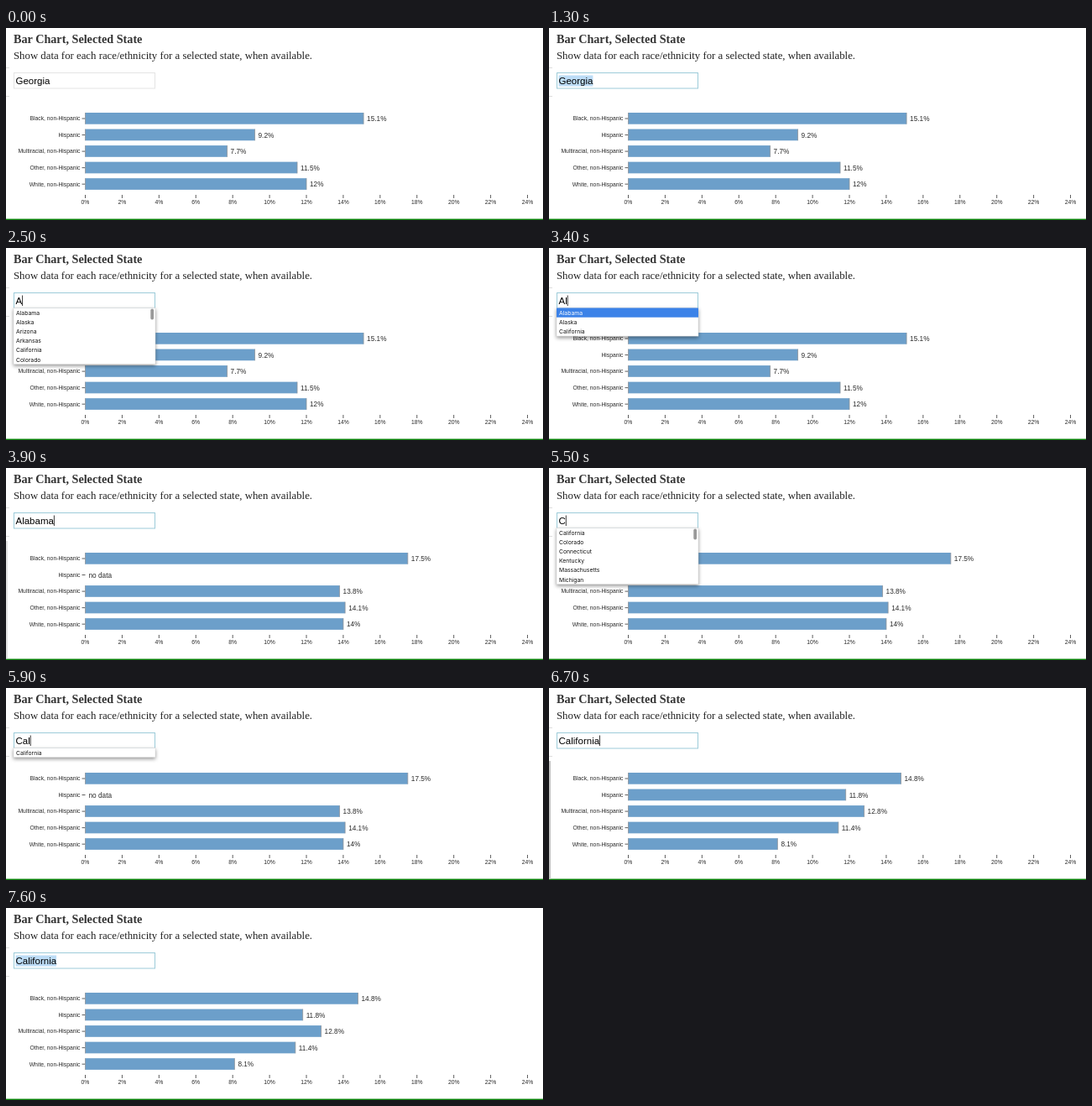
Animation, 640 px wide and 229 px high, one loop 8000 ms. Source, as an HTML page:

```html
<!DOCTYPE html>
<html lang="en">
<head>
<meta charset="utf-8">
<title>Bar Chart, Selected State</title>
<style>
  html, body { margin: 0; width: 100%; height: 100%; overflow: hidden; background: #fff; }
  svg { display: block; width: 640px; height: 229px; }
  text { font-family: "Liberation Sans", Arial, sans-serif; fill: #2b2b2b; white-space: pre; }
  .title { font: bold 14.2px "Liberation Serif", serif; fill: #333; }
  .lead { font: 12.8px "Liberation Serif", serif; fill: #222; }
  .axis { font-size: 6.8px; }
  .value { font-size: 8.25px; }
  .entry { font-size: 11.5px; fill: #000; }
  .option { font: 6.8px Inter, sans-serif; fill: #111; }
  .popup { filter: drop-shadow(0 2px 2px rgba(0, 0, 0, .4)); }
</style>
</head>
<body>
<svg viewBox="0 0 640 229">
  <text class="title" x="9" y="18">Bar Chart, Selected State</text>
  <text class="lead" x="9" y="37">Show data for each race/ethnicity for a selected state, when available.</text>
  <path d="M0 47.5H4M0 81.5H4" stroke="#ddd"/>
  <g id="axes"></g>
  <g id="bars"></g>
  <rect y="227.6" width="640" height="1.4" fill="#0a840a"/>
  <rect id="strip" y="87" width="2" height="141" fill="#c4c4c4"/>
  <rect id="field" x="9.5" y="53.5" width="168" height="18.5" fill="#fff"/>
  <rect id="selection" x="11.5" y="56.5" height="13" fill="#bcdcf6"/>
  <text id="entry" class="entry" x="11.5" y="67"></text>
  <rect id="caret" y="56.5" width=".9" height="12.5" fill="#222"/>
  <g id="popup" class="popup"></g>
</svg>
<script>
const LOOP = 8000;
const GROUPS = ["Black, non-Hispanic", "Hispanic", "Multiracial, non-Hispanic", "Other, non-Hispanic", "White, non-Hispanic"];
const RATES = {
  Georgia: [15.1, 9.2, 7.7, 11.5, 12],
  Alabama: [17.5, null, 13.8, 14.1, 14],
  California: [14.8, 11.8, 12.8, 11.4, 8.1]
};
const MATCHES = {
  A: ["Alabama", "Alaska", "Arizona", "Arkansas", "California", "Colorado"],
  Al: ["Alabama", "Alaska", "California"],
  C: ["California", "Colorado", "Connecticut", "Kentucky", "Massachusetts", "Michigan"],
  Ca: ["California", "North Carolina", "South Carolina"],
  Cal: ["California"]
};

// Each step overrides part of the state from its time (ms) onward.
const START = { state: "Georgia", text: "Georgia", focus: false, caret: false, selected: false, list: "", active: false, strip: 0 };
const STEPS = [
  [600, { focus: true }],
  [1300, { selected: true }],
  [2500, { text: "A", list: "A", selected: false, caret: true }],
  [2700, { text: "Al" }],
  [2800, { list: "Al", caret: false }],
  [3400, { active: true, caret: true }],
  [3700, { state: "Alabama", text: "Alabama", list: "", active: false, strip: 1 }],
  [3900, { strip: .5 }],
  [4000, { strip: 0, caret: false }],
  [4500, { caret: true }],
  [4800, { selected: true, caret: false }],
  [5500, { text: "C", list: "C", selected: false, caret: true }],
  [5700, { text: "Ca" }],
  [5800, { list: "Ca" }],
  [5900, { text: "Cal", list: "Cal" }],
  [6300, { caret: false }],
  [6400, { active: true, caret: true }],
  [6700, { state: "California", text: "California", list: "", active: false, strip: 1 }],
  [6900, { strip: .7, caret: false }],
  [7000, { strip: .35 }],
  [7100, { strip: 0 }],
  [7400, { caret: true }],
  [7600, { selected: true, caret: false }]
];

const el = id => document.getElementById(id);
const set = (id, attrs) => Object.entries(attrs).forEach(([key, value]) => el(id).setAttribute(key, value));
const label = (cls, x, y, text, anchor = "start", extra = "") =>
  `<text class="${cls}" x="${x}" y="${y}" text-anchor="${anchor}" ${extra}>${text}</text>`;
const rect = (x, y, w, h, attrs) => `<rect x="${x}" y="${y}" width="${w}" height="${h}" ${attrs}/>`;
const scaleX = percent => 94.5 + percent * 21.96;
const rowY = i => 108 + i * 19.55;

function drawAxes() {
  let out = "";
  GROUPS.forEach((name, i) => {
    const y = rowY(i);
    out += `<path d="M90.5 ${y}h4" stroke="#333" stroke-width=".8"/>` + label("axis", 88.5, y + 2.3, name, "end");
  });
  for (let p = 0; p <= 24; p += 2) {
    const x = scaleX(p);
    out += `<path d="M${x} 199v4" stroke="#333" stroke-width=".8"/>` + label("axis", x, 210.2, p + "%", "middle");
  }
  el("axes").innerHTML = out;
}

function drawBars(state) {
  el("bars").innerHTML = RATES[state].map((rate, i) => {
    const y = rowY(i), x = scaleX(rate || 0);
    const bar = rate === null ? "" :
      rect(94.5, y - 7, x - 94.5, 13.7, 'fill="#6c9fca"') +
      `<path d="M94.5 ${y - 7}v13.7M${x} ${y - 7}v13.7" stroke="#8c9299" stroke-width=".8"/>`;
    return bar + label("value", x + 4, y + 3, rate === null ? "no data" : rate + "%");
  }).join("");
}

function drawPopup(list, active) {
  const options = MATCHES[list] || [], rowHeight = 11.2, top = 71.5;
  let out = options.length ? rect(9, top, 169, options.length * rowHeight, 'fill="#fff" stroke="#d4d4d4" stroke-width=".5"') : "";
  options.forEach((name, i) => {
    const lit = active && i === 0;
    if (lit) out += rect(9, top, 169, rowHeight, 'fill="#3b82e8"');
    out += label("option", 12, top + i * rowHeight + 8, name, "start", lit ? 'style="fill:#fff"' : "");
  });
  if (options.length === 6) out += rect(172.3, 72.5, 3.8, 13, 'rx="1.9" fill="#999"');
  el("popup").innerHTML = out;
}

function render(s) {
  drawBars(s.state);
  drawPopup(s.list, s.active);
  el("entry").textContent = s.text;
  const width = el("entry").getComputedTextLength();
  set("field", { stroke: s.focus ? "#9ccbd9" : "#e4e4e4" });
  set("selection", { width: s.selected ? width : 0 });
  set("caret", { x: 11.5 + width, opacity: s.caret ? 1 : 0 });
  set("strip", { opacity: s.strip });
}

let shown = -1;
function tick() {
  const time = performance.now() % LOOP;
  const passed = STEPS.filter(([at]) => at <= time);
  if (passed.length !== shown) {
    shown = passed.length;
    render(Object.assign({}, START, ...passed.map(([, change]) => change)));
  }
  requestAnimationFrame(tick);
}

drawAxes();
tick();
</script>
</body>
</html>
```
